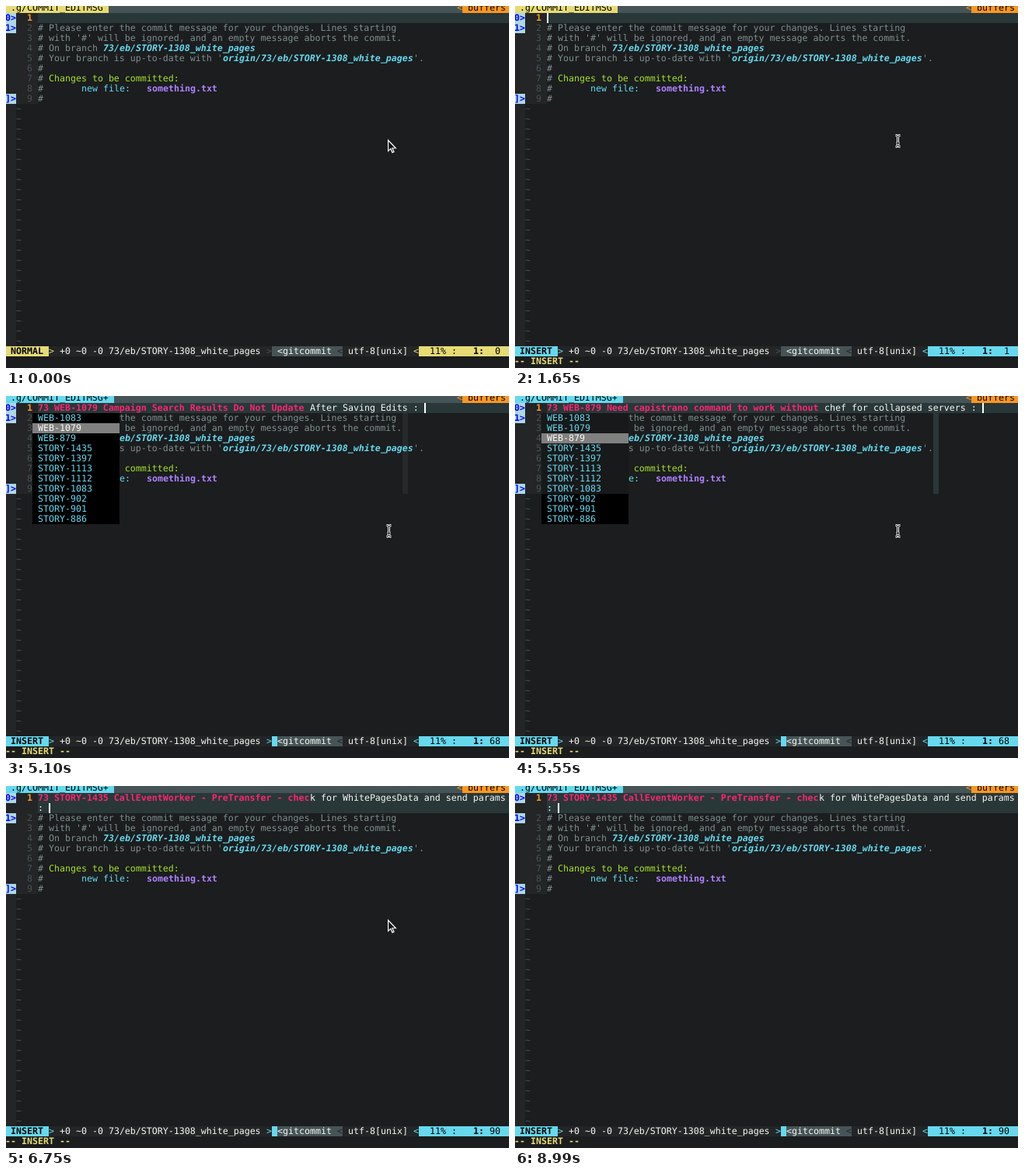
Write an HTML page that moves like this. It is 647x466 px and loops after 9.12 s.

```html
<!DOCTYPE html>
<html lang="en">
<head>
<meta charset="utf-8">
<title>Commit message completion</title>
<style>
  html, body { margin: 0; width: 100%; height: 100%; overflow: hidden; background: #1b1d1e; }
  #stage { position: relative; width: 647px; height: 466px; overflow: hidden; background: #1b1d1e; }
  .scene { position: absolute; inset: 0; visibility: hidden; }
  .scene.on { visibility: visible; }
  .scene i, .scene span { position: absolute; display: block; height: 13px; }
  .scene span {
    font: 11.627px/13px "DejaVu Sans Mono", "Liberation Mono", monospace;
    text-rendering: geometricPrecision;
    white-space: pre;
  }
  .scene .b { font-weight: bold; }
  .scene .em { font-weight: bold; font-style: italic; }
  #caret { position: absolute; width: 2px; height: 13px; background: #fff; }
  svg { position: absolute; left: 0; top: 0; overflow: visible; }
</style>
</head>
<body>
<div id="stage">
  <div id="caret"></div>
  <svg id="arrow" width="12" height="19">
    <path d="M.6 .8V14.6L3.8 11.7L6 16.6L8 15.7L5.9 11H10.3Z" fill="#111" stroke="#fff" stroke-width="1.2"/>
  </svg>
  <svg id="beam" width="10" height="18" fill="none">
    <path id="stem" d="M1.5 1.5Q4.5 1.5 4.5 4Q4.5 1.5 7.5 1.5M4.5 4V13.5M1.5 16Q4.5 16 4.5 13.5Q4.5 16 7.5 16M2.5 11.5H6.5" stroke="#fff" stroke-width="3"/>
    <use href="#stem" style="display:none"/>
    <path d="M1.5 1.5Q4.5 1.5 4.5 4Q4.5 1.5 7.5 1.5M4.5 4V13.5M1.5 16Q4.5 16 4.5 13.5Q4.5 16 7.5 16M2.5 11.5H6.5" stroke="#111"/>
  </svg>
</div>
<script>
const LOOP = 9120, CELL = 7, LINE = 13;
const C = {
  bg: '#1b1d1e', gutter: '#232526', grey: '#465457', line: '#293739', text: '#f8f8f2',
  note: '#7e8e91', cyan: '#66d9ef', yellow: '#e6db74', orange: '#fd971f',
  green: '#a6e22e', purple: '#ae81ff', pink: '#f92672'
};
const BRANCH = '73/eb/STORY-1308_white_pages';
const TICKETS = ['WEB-1083', 'WEB-1079', 'WEB-879', 'STORY-1435', 'STORY-1397', 'STORY-1113',
  'STORY-1112', 'STORY-1083', 'STORY-902', 'STORY-901', 'STORY-886'];

// Each body line is a list of [text, colour, style] runs.
const BODY = [
  [['# Please enter the commit message for your changes. Lines starting', C.note]],
  [["# with '#' will be ignored, and an empty message aborts the commit.", C.note]],
  [['# On branch ', C.note], [BRANCH, C.cyan, 'em']],
  [["# Your branch is up-to-date with '", C.note], ['origin/' + BRANCH, C.cyan, 'em'], ["'.", C.note]],
  [['#', C.note]],
  [['# ', C.note], ['Changes to be committed:', C.green]],
  [['#       ', C.note], ['new file:   ', C.cyan], ['something.txt', C.purple, 'b']],
  [['#', C.note]]
];

const LONG = '73 STORY-1435 CallEventWorker - PreTransfer - check for WhitePagesData and send params : ';
const SCENES = [
  { at: 0, normal: true, msg: '', col: ' 0' },
  { at: 150, msg: '', col: ' 1' },
  { at: 4200, msg: '73 WEB-1083 Cancel Button on QLMT Campaign Selection Not Working : ', col: '68', pick: 0, stripe: 67, stripeColor: '#25292b' },
  { at: 5100, msg: '73 WEB-1079 Campaign Search Results Do Not Update After Saving Edits : ', col: '68', pick: 1, stripe: 67, stripeColor: '#25292b' },
  { at: 5550, msg: '73 WEB-879 Need capistrano command to work without chef for collapsed servers : ', col: '68', pick: 2, stripe: 71, stripeColor: C.line, dim: 8, dimColor: '#17191a' },
  { at: 6000, msg: LONG, col: '90', pick: 3, dim: 11, dimColor: C.bg },
  { at: 6750, msg: LONG, col: '90' }
];
const CARET = [[0, 0], [150, 1], [900, 0], [1050, 1], [1500, 0], [1650, 1], [6600, 0], [6750, 1], [8700, 0], [8990, 1]];
const POINTER = [[0, 'arrow', 491, 172], [150, 'beam', 488, 165], [6750, 'arrow', 491, 172],
  [7350, 'arrow', 516, 214], [7500, 'arrow', 595, 451], [7650, '']];

const $ = id => document.getElementById(id);
const stage = $('stage');
const x = col => col * CELL - 1;
const y = row => row * LINE - 4;

function add(scene, tag, col, row) {
  const el = document.createElement(tag);
  el.style.left = x(col) + 'px';
  el.style.top = y(row) + 'px';
  return scene.appendChild(el);
}
function fill(scene, col, row, cols, color, rows = 1) {
  const el = add(scene, 'i', col, row);
  el.style.width = cols * CELL + 'px';
  el.style.height = rows * LINE + 'px';
  el.style.background = color;
}
function put(scene, col, row, text, color, style = '') {
  const el = add(scene, 'span', col, row);
  el.textContent = text;
  el.style.color = color;
  el.className = style;
  return col + text.length;
}

function drawTabs(scene, s) {
  const name = '.g/COMMIT_EDITMSG' + (s.msg ? '+' : '');
  fill(scene, 0, 0, 94, C.grey);
  fill(scene, 0, 0, name.length + 2, s.msg ? C.cyan : C.yellow);
  put(scene, 1, 0, name, '#000');
  put(scene, 83, 0, '<', C.orange);
  fill(scene, 84, 0, 10, C.orange);
  put(scene, 85, 0, 'buffers', '#000');
}

function drawText(scene, s, wrap) {
  fill(scene, 0, 1, 2, C.gutter, 33);
  fill(scene, 2, 1, 4, C.gutter, 9 + wrap);
  fill(scene, 6, 1, 88, C.line, 1 + wrap);
  if (s.stripe) fill(scene, 6 + s.stripe, 2, 1, s.stripeColor, 8);

  put(scene, 4, 1, '1', C.orange, 'b');
  put(scene, 6, 1, s.msg.slice(0, 50), C.pink, 'b');
  put(scene, 56, 1, s.msg.slice(50, 87), C.text);
  if (wrap) put(scene, 6, 2, s.msg.slice(87), C.text);

  BODY.forEach((runs, i) => {
    const row = i + 2 + wrap;
    put(scene, 4, row, String(i + 2), C.grey);
    runs.reduce((col, [text, color, style]) => put(scene, col, row, text, color, style), 6);
  });
  for (let row = 10 + wrap; row < 34; row++) put(scene, 2, row, '~', C.grey);

  [['0>', 1], ['1>', 2 + wrap], [']>', 9 + wrap]].forEach(([mark, row]) => {
    fill(scene, 0, row, 2, '#add8e6');
    put(scene, 0, row, mark, '#00f', 'b');
  });
}

function drawMenu(scene, s, top) {
  fill(scene, 5, top, 16, '#000', TICKETS.length);
  if (s.dim) fill(scene, 5, top, 16, s.dimColor, s.dim);
  fill(scene, 5, top + s.pick, 16, '#808080');
  TICKETS.forEach((id, i) => put(scene, 6, top + i, id, i === s.pick ? C.text : C.cyan));
}

function drawStatus(scene, s) {
  const row = 34, mode = s.normal ? C.yellow : C.cyan, mid = s.msg ? C.cyan : C.grey;
  fill(scene, 0, row, 94, C.gutter);
  fill(scene, 0, row, 8, mode);
  put(scene, 1, row, s.normal ? 'NORMAL' : 'INSERT', '#000', 'b');
  put(scene, 8, row, '>', mode);
  put(scene, 10, row, '+0 ~0 -0 ' + BRANCH, C.text);
  put(scene, 48, row, '>', mid);
  fill(scene, 49, row, 13, C.grey);
  fill(scene, 49, row, 1, mid);
  put(scene, 50, row, '<gitcommit', C.text);
  put(scene, 61, row, '<', C.gutter);
  put(scene, 63, row, 'utf-8[unix]', C.text);
  put(scene, 75, row, '<', mode);
  fill(scene, 76, row, 18, mode);
  put(scene, 78, row, '11% :', '#000');
  put(scene, 86, row, '1:', '#000', 'b');
  put(scene, 89, row, s.col, '#000');
  if (!s.normal) put(scene, 0, row + 1, '-- INSERT --', C.yellow, 'b');
}

const scenes = SCENES.map(s => {
  const scene = document.createElement('div');
  const wrap = s.msg.length > 87 ? 1 : 0;
  scene.className = 'scene';
  drawTabs(scene, s);
  drawText(scene, s, wrap);
  drawStatus(scene, s);
  if (s.pick !== undefined) drawMenu(scene, s, 2 + wrap);
  stage.insertBefore(scene, $('caret'));
  return scene;
});

const indexAt = (steps, t, time) => {
  let i = steps.length - 1;
  while (i > 0 && time(steps[i]) > t) i--;
  return i;
};

function render(t) {
  const now = indexAt(SCENES, t, s => s.at);
  scenes.forEach((el, i) => el.classList.toggle('on', i === now));

  const caret = $('caret').style, length = SCENES[now].msg.length;
  const wrap = length > 87 ? 1 : 0;
  caret.left = x(6 + length - wrap * 87) + 'px';
  caret.top = y(1 + wrap) + 'px';
  caret.visibility = CARET[indexAt(CARET, t, c => c[0])][1] ? 'visible' : 'hidden';

  const [, shape, px, py] = POINTER[indexAt(POINTER, t, p => p[0])];
  ['arrow', 'beam'].forEach(id => {
    const style = $(id).style;
    style.visibility = id === shape ? 'visible' : 'hidden';
    if (id === shape) style.transform = `translate(${px}px, ${py}px)`;
  });
}

const start = performance.now();
function tick() {
  render((performance.now() - start) % LOOP);
  requestAnimationFrame(tick);
}
tick();
</script>
</body>
</html>
```
